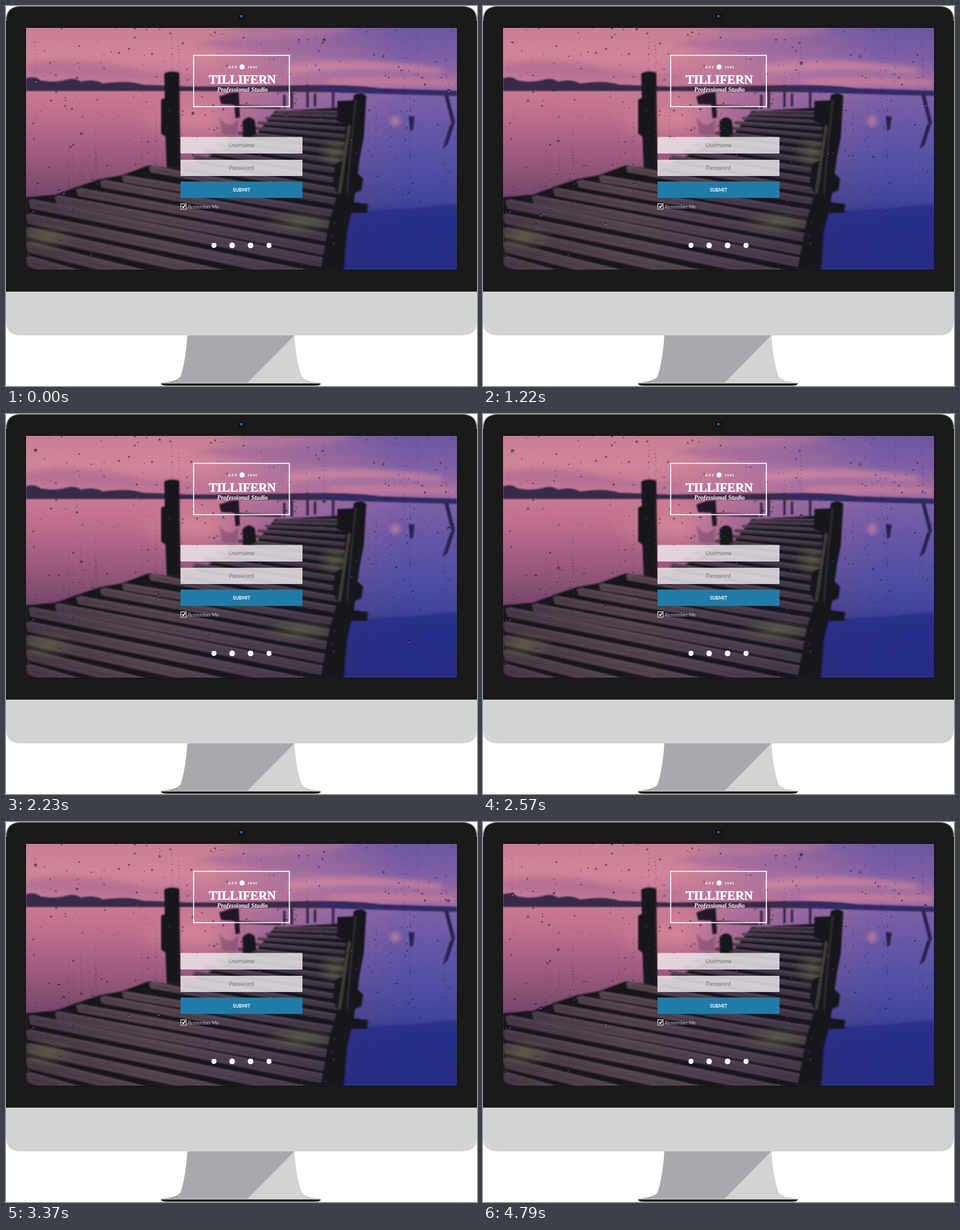
Animation, 753 px wide and 608 px high, one loop 4.89 s. Source, as an HTML page with a canvas:

```html
<!DOCTYPE html>
<html lang="en">
<head>
<meta charset="utf-8">
<title>Login screen in the rain</title>
<style>
  html, body { margin: 0; width: 100%; height: 100%; overflow: hidden; background: #fff; }
  svg, canvas { position: absolute; left: 0; top: 0; display: block; }
  #rain { left: 32px; top: 35px; }
  text { text-anchor: middle; }
  .sans { font-family: Lato, "Open Sans", sans-serif; }
  .serif { font-family: "Liberation Serif", "Noto Serif", serif; fill: #fff; }
</style>
</head>
<body>
<svg width="753" height="608" viewBox="0 0 753 608">
  <defs>
    <linearGradient id="sky" x2="0" y2="1">
      <stop offset="0" stop-color="#c98094"/><stop offset=".45" stop-color="#d08598"/>
      <stop offset=".75" stop-color="#c67b97"/><stop offset="1" stop-color="#b86f91"/>
    </linearGradient>
    <linearGradient id="skyRight" x2="0" y2="1">
      <stop offset="0" stop-color="#6c56a2"/><stop offset=".5" stop-color="#7f60a6"/>
      <stop offset=".85" stop-color="#a76f9f"/><stop offset="1" stop-color="#8462a4"/>
    </linearGradient>
    <linearGradient id="sea" x2="0" y2="1">
      <stop offset="0" stop-color="#c97b92"/><stop offset=".16" stop-color="#bb6c8b"/>
      <stop offset=".35" stop-color="#a05c80"/><stop offset=".6" stop-color="#744668"/>
      <stop offset="1" stop-color="#4a3050"/>
    </linearGradient>
    <linearGradient id="seaRight" x2="0" y2="1">
      <stop offset="0" stop-color="#8062a8"/><stop offset=".18" stop-color="#6b58a6"/>
      <stop offset=".42" stop-color="#5150a5"/><stop offset=".62" stop-color="#41459b"/>
      <stop offset=".72" stop-color="#2c3290"/><stop offset="1" stop-color="#262b80"/>
    </linearGradient>
    <linearGradient id="fade" gradientUnits="userSpaceOnUse" x1="320" x2="640" y1="0" y2="0">
      <stop offset="0" stop-color="#000"/><stop offset=".45" stop-color="#888"/><stop offset="1" stop-color="#fff"/>
    </linearGradient>
    <mask id="toRight" maskUnits="userSpaceOnUse" x="0" y="0" width="753" height="430">
      <rect width="753" height="430" fill="url(#fade)"/>
    </mask>
    <linearGradient id="wood" gradientUnits="userSpaceOnUse" x1="32" x2="530" y1="0" y2="0">
      <stop offset="0" stop-color="#473845"/><stop offset=".4" stop-color="#56444f"/>
      <stop offset=".75" stop-color="#4c3d4e"/><stop offset="1" stop-color="#403647"/>
    </linearGradient>
    <radialGradient id="glow"><stop offset="0" stop-color="#d98b9a"/><stop offset="1" stop-color="#d98b9a" stop-opacity="0"/></radialGradient>
    <radialGradient id="moss"><stop offset="0" stop-color="#6f7348" stop-opacity=".55"/><stop offset="1" stop-color="#6f7348" stop-opacity="0"/></radialGradient>
    <filter id="soft" x="-5%" y="-5%" width="110%" height="110%"><feGaussianBlur stdDeviation=".9"/></filter>
    <filter id="haze" x="-20%" y="-60%" width="140%" height="220%"><feGaussianBlur stdDeviation="5"/></filter>
    <clipPath id="screen"><rect x="32" y="35" width="689" height="387"/></clipPath>
  </defs>

  <!-- monitor -->
  <path d="M0 457V23Q0 .5 23 .5H730Q753 .5 753 23V457Z" fill="#1a1a1a"/>
  <path d="M.5 24Q.5 .5 24 .5H729Q752.500 .5 752.500 24" fill="none" stroke="#8b8b8d"/>
  <path d="M0 457H753V504Q753 527 730 527H23Q0 527 0 504Z" fill="#d1d3d4"/>
  <path d="M290 527H461Q464 570 473 593Q477 600 503 603H248Q274 600 279 593Q287 570 290 527Z" fill="#d1d3d4"/>
  <path d="M290 527H461L386 603H248Q274 600 279 593Q287 570 290 527Z" fill="#a7a9ac"/>
  <path d="M248 603H503V605Q501 607.500 495 607.500H257Q250 607.500 248 605Z" fill="#151515"/>
  <path d="M248 603.500H503" stroke="#c4c6c7"/>
  <circle cx="377" cy="17" r="5" fill="#0a0c12"/>
  <circle cx="377" cy="17" r="3" fill="#152c50"/>
  <circle cx="376" cy="16" r="1.200" fill="#6aa5d8"/>
  <rect x="31.500" y="34.500" width="690" height="388" fill="#080808"/>

  <!-- jetty at dusk -->
  <g clip-path="url(#screen)">
    <rect x="32" y="35" width="689" height="105" fill="url(#sky)"/>
    <rect x="32" y="35" width="689" height="105" fill="url(#skyRight)" mask="url(#toRight)"/>
    <g filter="url(#haze)">
      <path d="M32 94Q110 80 190 99T330 107L300 118Q160 116 32 109Z" fill="#a9668f" opacity=".6"/>
      <path d="M300 60Q390 45 500 62T640 72Q560 82 450 75T300 60Z" fill="#9d659b" opacity=".55"/>
      <path d="M450 94Q560 79 700 101L690 108Q570 96 450 108Z" fill="#d98a9e" opacity=".75"/>
      <path d="M400 35H560Q520 53 410 48Z" fill="#bd799d" opacity=".55"/>
      <path d="M510 118Q610 108 721 121V127H520Z" fill="#ce8199" opacity=".7"/>
    </g>
    <rect x="32" y="135" width="689" height="287" fill="url(#sea)"/>
    <ellipse cx="310" cy="180" rx="110" ry="44" fill="url(#glow)" opacity=".8"/>
    <rect x="32" y="135" width="689" height="287" fill="url(#seaRight)" mask="url(#toRight)"/>
    <ellipse cx="622" cy="184" rx="13" ry="13" fill="url(#glow)" opacity=".65"/>
    <path d="M545 328L640 325L721 317V422H530Z" fill="#282d87" opacity=".7" filter="url(#soft)"/>
    <g filter="url(#soft)">
      <path d="M32 116Q45 111 55 119Q75 123 93 119Q108 113 120 121Q140 116 155 124Q195 118 218 126L300 129L470 127Q550 125 600 132L721 136V143L530 138L300 136L32 136Z" fill="#392b48"/>
      <path d="M470 128Q550 126 600 132L721 136V144L520 138Z" fill="#302b62"/>
      <path d="M341 145L358 139L372 138L374 178L367 180L365 158L344 157Z" fill="#20182a"/>
      <path d="M341 178Q356 201 372 180L370 206H346Z" fill="#693f63" opacity=".45"/>
      <path d="M366 160L440 163" stroke="#35253d" stroke-width="4"/>
      <path d="M445 142V165M457 135V164M482 126V162M494 140V161M523 138V163" stroke="#382a45" stroke-width="4"/>
      <path d="M644 176L653 177L651 197L646 200Z M701 142L707 143L718 187L713 190Z M717 187L706 222L698 229L710 190Z" fill="#26204b"/>
      <path d="M430 168L550 162L546 215L536 300L520 422H32V306L79 302L112 290L150 277L185 271L228 255L282 262L378 213L403 202Z" fill="#19141f"/>
      <g id="planks"></g>
      <g>
        <ellipse cx="470" cy="346" rx="65" ry="22" fill="url(#moss)"/>
        <ellipse cx="65" cy="370" rx="50" ry="25" fill="url(#moss)"/>
        <ellipse cx="525" cy="235" rx="30" ry="28" fill="url(#moss)"/>
      </g>
      <path d="M253 108Q264 102 277 107L279 262L257 258L255 209L248 204L248 150L254 147Z" fill="#17121c"/>
      <path d="M378 185Q388 172 398 184L400 206L379 211Z" fill="#17121d"/>
      <path d="M556 143Q567 136 576 144L572 210L566 240L562 268L571 276L568 295L558 299L556 314L579 317L577 331L552 331L545 360L540 422H503L516 350L530 300L522 285L526 253L541 245L549 190L529 184L530 152L555 151Z" fill="#16131f"/>
      <path d="M549 192L541 243L533 300" fill="none" stroke="#50503e" stroke-width="5" opacity=".65"/>
      <path d="M559 150L552 220L545 300" fill="none" stroke="#3b3440" stroke-width="3" opacity=".7"/>
    </g>
  </g>
</svg>

<canvas id="rain" width="689" height="387"></canvas>

<svg width="753" height="608" viewBox="0 0 753 608">
  <!-- header -->
  <rect x="300" y="79" width="153" height="82" fill="none" stroke="#fff" stroke-width="1.600"/>
  <circle cx="377.500" cy="97.500" r="4" fill="#fff"/>
  <text class="serif" x="363" y="100" font-size="6.500" font-weight="700" letter-spacing=".8">EST</text>
  <text class="serif" x="394" y="100" font-size="6.500" font-weight="700" letter-spacing=".8">1945</text>
  <text class="serif" x="378" y="124" font-size="19.500" font-weight="700" stroke="#fff" stroke-width=".5">TILLIFERN</text>
  <text class="serif" x="378" y="137" font-size="10" font-style="italic" font-weight="700">Professional Studio</text>

  <!-- form -->
  <g class="sans">
    <path d="M279 209.500H474V236H279ZM279 246H474V272H279Z" fill="#eee8ee" fill-opacity=".84"/>
    <rect x="279" y="281" width="195" height="26" fill="#217ba8"/>
    <g font-size="9.500" fill="#77727a">
      <text x="376.500" y="226">Username</text>
      <text x="376.500" y="262">Password</text>
    </g>
    <text x="376.500" y="296.500" font-size="7.300" font-weight="700" fill="#fff">SUBMIT</text>
    <rect x="279.500" y="316.500" width="8.500" height="8.500" fill="#282129" stroke="#eee"/>
    <path d="M281.500 320.500L283.300 322.700L286.500 318.200" fill="none" stroke="#fff" stroke-width="1.500"/>
    <text x="315.500" y="323.700" font-size="7.700" fill="#c9c3ca">Remember Me</text>
  </g>
  <g fill="#fff">
    <circle cx="332.500" cy="383" r="4"/><circle cx="361.500" cy="383" r="4.500"/>
    <circle cx="391" cy="383" r="4.500"/><circle cx="420.500" cy="383" r="4"/>
  </g>
</svg>

<script>
const LOOP = 4890, W = 689, H = 387;

// Evenly spaced picture changes: first time, last time, count
const runs = [[0, 0, 1], [220, 680, 5], [800, 1220, 5], [1330, 1790, 5], [1900, 2360, 5],
  [2470, 2920, 5], [3040, 3490, 5], [3600, 4080, 5], [4200, 4320, 2], [4560, 4790, 3]];
const ticks = runs.flatMap(([a, b, n]) =>
  Array.from({ length: n }, (_, i) => a + (n > 1 ? (b - a) * i / (n - 1) : 0)));

function random(seed) {
  return () => {
    seed = (seed * 1664525 + 1013904223) >>> 0;
    return seed / 4294967296;
  };
}
const rnd = random(77);

// Deck boards: left x, left y, right x, right y, thickness
const boards = [[228, 256, 530, 308, 10], [185, 271, 528, 327, 11], [150, 278, 526, 346, 12],
  [112, 291, 526, 366, 13], [78, 303, 520, 386, 14], [36, 309, 512, 404, 15],
  [32, 332, 508, 428, 16], [32, 354, 400, 434, 16], [32, 377, 260, 432, 17], [32, 400, 150, 432, 17]];
for (let i = 0; i < 11; i++) {
  const k = (i / 10) ** 1.3;
  boards.unshift([432 - 152 * k, 167 + 82 * k, 546 - 12 * k, 168 + 124 * k, 4 + 5 * k]);
}
document.getElementById('planks').innerHTML = boards.map(([x, y, r, s, h]) =>
  `<path d="M${x} ${y + 2}L${x + 6} ${y}L${r} ${s}L${r - 2} ${s + h}L${x + 3} ${y + h}Z" fill="url(#wood)"/>
   <path d="M${x + 5} ${y + 1}L${r} ${s + 1}" stroke="#88717f" stroke-opacity=".3" stroke-width="1.500"/>
   <path d="M${x + 9} ${y + h * .6}L${r} ${s + h * .65}" stroke="#251d29" stroke-opacity=".5"/>`).join('');

// Still beads, a third of them coming and going within the loop
const beads = Array.from({ length: 850 }, () => ({
  x: rnd() * W, y: rnd() * H, r: .45 + 1.35 * rnd() ** 3,
  born: rnd(), life: rnd() < .35 ? .3 + .5 * rnd() : 1
}));
// Columns of tiny beads left by earlier runs
for (let i = 0; i < 34; i++) {
  const x = rnd() * W, top = rnd() * H * .6, n = 8 + rnd() * 20;
  for (let j = 0; j < n; j++)
    beads.push({ x: x + rnd() * 1.5, y: top + j * (5 + rnd() * 2), r: .45 + rnd() * .35, born: 0, life: 1 });
}
const runners = Array.from({ length: 16 }, () => ({
  x: 10 + rnd() * (W - 20), y: rnd() * H * .8, r: 1.7 + rnd() * .9,
  born: rnd(), fall: 40 + rnd() * 110
}));

const ctx = document.getElementById('rain').getContext('2d');

function dot(x, y, rx, ry, fill) {
  ctx.fillStyle = fill;
  ctx.beginPath();
  ctx.ellipse(x, y, rx, ry, 0, 0, 7);
  ctx.fill();
}

function drop(x, y, r) {
  dot(x, y, r, r * 1.2, 'rgba(38,22,48,.62)');
  const tint = x > 470 ? '150,145,218' : '226,166,190';
  dot(x + r * .1, y + r * .65, r * .6, r * .42, `rgba(${tint},.68)`);
}

function draw(time) {
  const t = time / LOOP;
  ctx.clearRect(0, 0, W, H);
  for (const b of beads) {
    const age = (t - b.born + 1) % 1;
    if (age < b.life) drop(b.x, b.y, b.r * (b.life < 1 ? Math.min(1, .6 + age * 4) : 1));
  }
  for (const d of runners) {
    const age = (t - d.born + 1) % 1;
    const slide = d.fall * Math.max(0, (age - .25) / .75) ** 2;
    for (let s = 0; s < slide - 4; s += 6) drop(d.x + Math.sin(s) * .6, d.y + s, .6);
    drop(d.x, d.y + slide, d.r * Math.min(1, .4 + age * 3));
  }
}

let shown = -1;
function loop(now) {
  const t = now % LOOP;
  const i = ticks.findLastIndex(v => v <= t);
  if (i !== shown) draw(ticks[shown = i]);
  requestAnimationFrame(loop);
}
draw(0);
requestAnimationFrame(loop);
</script>
</body>
</html>
```
